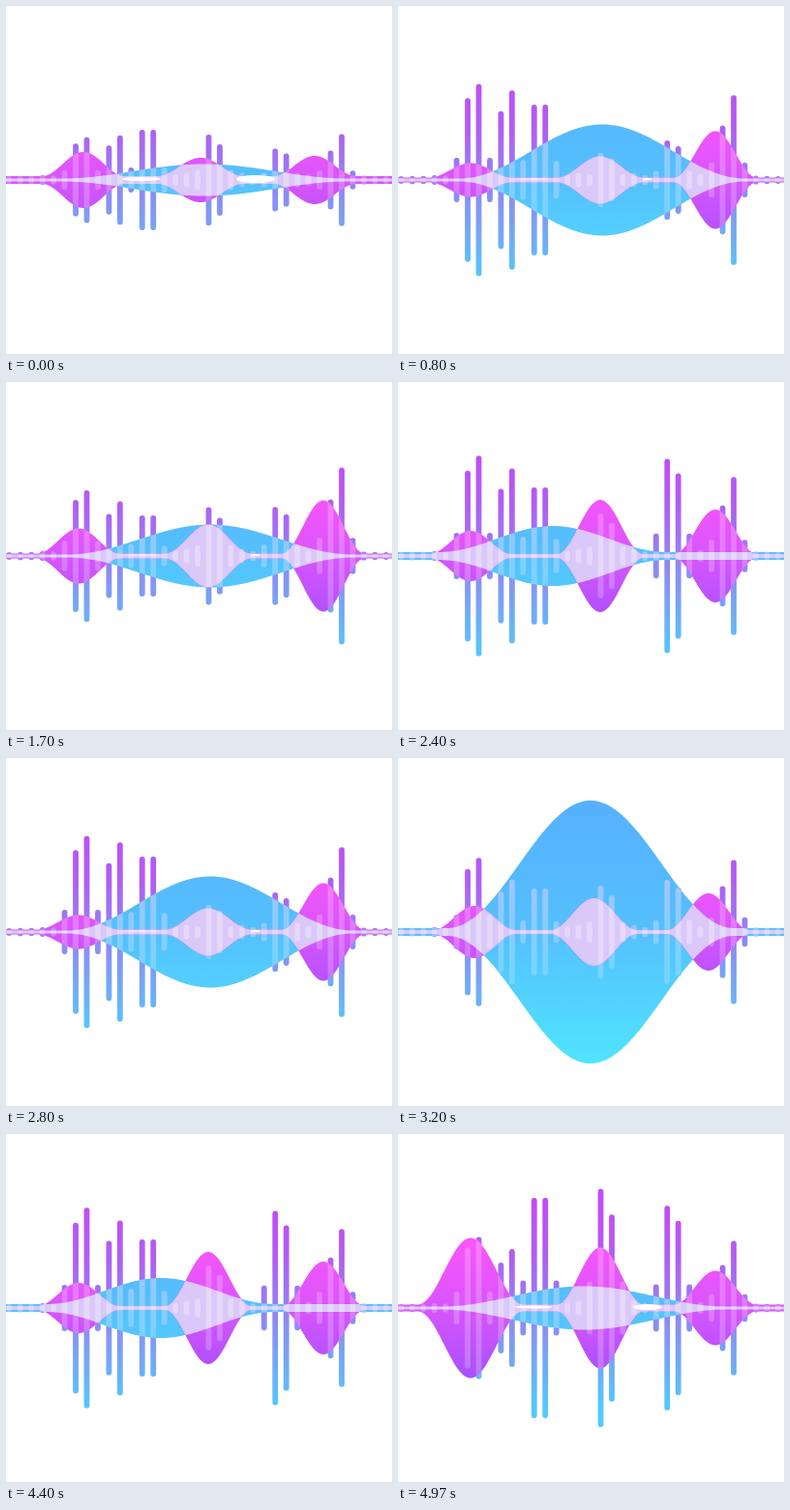
An HTML page with a canvas for the animation above (5070 ms loop, 399 by 360 pixels).

```html
<!DOCTYPE html>
<html>
<head>
<meta charset="utf-8">
<title>Sound wave</title>
<style>
  html, body { margin: 0; height: 100%; overflow: hidden; background: #fff; }
  canvas { display: block; }
</style>
</head>
<body>
<canvas id="stage" width="399" height="360"></canvas>
<script>
const ctx = document.getElementById('stage').getContext('2d');
const W = 399, MID = 180, LOOP = 5070, CYCLE = 25;

// Key poses of the cycle. humps: left, middle, right height and shift;
// blue: height, centre, edge; gap: white opening; beat: level of each bar pair.
const poses = [
  { step: 0, humps: [25, 19, 21, 1], blue: [15, 205, 1.5], gap: [4], beat: [41, 41, 52, 42, 30, 39] },
  { step: 5, humps: [24, 56, 46, 0], blue: [27, 160, 4], gap: [0], beat: [96, 80, 71, 39, 93, 67] },
  { step: 10, humps: [15, 22, 48, 0], blue: [56, 211, 1.5], gap: [1], beat: [92, 82, 78, 25, 38, 72] },
  { step: 12, humps: [69, 59, 35, 0], blue: [21, 192, 1.5], gap: [3], beat: [68, 54, 114, 110, 98, 57] },
  { step: 15, humps: [25, 33, 38, .8], blue: [132, 199, 4], gap: [0], beat: [71, 48, 45, 43, 50, 61] },
  { step: 21, humps: [26, 30, 55, 0], blue: [31, 211, 1.5], gap: [1], beat: [63, 50, 42, 45, 47, 75] }
];
poses.push({ ...poses[0], step: CYCLE });

// First bar of each pair, and how much the second one outgrows it.
const pairs = [[6, .08], [9, .13], [12, 0], [18, -.12], [24, -.08], [29, .22]];

function gradient(top, bottom, ...colors) {
  const g = ctx.createLinearGradient(0, top, 0, bottom);
  colors.forEach((c, i) => g.addColorStop(i / (colors.length - 1), c));
  return g;
}
const barPaint = gradient(75, 285, '#c24cfa', '#b05ef3', '#9482f2', '#76a6f5', '#50caff');
const bluePaint = gradient(44, 316, '#56b0ff', '#55c0fc', '#50e4ff');
const pinkPaint = gradient(108, 252, '#fc55fc', '#d855fb', '#a850ff');
const glowPaint = gradient(130, 230, 'rgba(235,210,255,.5)', 'rgba(190,235,255,.3)');

const bump = (x, centre, width) => {
  const d = Math.abs(x - centre) / width;
  return d < 1 ? (1 + Math.cos(Math.PI * d)) / 2 : 0;
};

function mirrored(height) {
  const path = new Path2D();
  for (let x = 0; x <= W; x++) path.lineTo(x, MID - height(x));
  for (let x = W; x >= 0; x--) path.lineTo(x, MID + height(x));
  path.closePath();
  return path;
}

function poseAt(step) {
  const i = poses.findIndex(p => p.step > step);
  const a = poses[i - 1], b = poses[i];
  const f = (step - a.step) / (b.step - a.step);
  const mix = key => a[key].map((v, n) => v + (b[key][n] - v) * f);
  return { humps: mix('humps'), blue: mix('blue'), gap: mix('gap')[0], beat: mix('beat') };
}

// Tall pairs with lower neighbours; the bars between them only ripple.
function barHeight(n, beat) {
  let height = 4 + 4 * Math.abs(Math.sin(n * 1.7)) * Math.sin(Math.PI * n / 34);
  pairs.forEach(([first, lean], i) => {
    const side = n - first;
    if (side === 0) height = beat[i] * (1 - lean);
    else if (side === 1) height = beat[i] * (1 + lean);
    else if (side === -1 || side === 2) height = Math.max(height, beat[i] * .25);
  });
  return height;
}

function barPath(beat) {
  const path = new Path2D();
  for (let n = 0; n < 35; n++) {
    const h = barHeight(n, beat);
    path.roundRect(.4 + n * 11.457, MID - h, 5.8, 2 * h, 2.9);
  }
  return path;
}

function paint(path, style, clip) {
  ctx.save();
  if (clip) ctx.clip(clip);
  ctx.fillStyle = style;
  ctx.fill(path);
  ctx.restore();
}

function draw(step) {
  const { humps: [left, middle, right, shift], blue: [rise, centre, edge], gap, beat } = poseAt(step);
  const leftWidth = 43 + Math.max(0, left - 26) * .27;
  const blueWidth = 148 - Math.max(0, 190 - centre);

  const pink = mirrored(x => 2 + gap * .5 +
    left * bump(x, 75 + 5 * shift, leftWidth) +
    middle * bump(x, 209 - 8 * shift, 45) +
    right * bump(x, 328 - 9 * shift, 43));
  const blue = mirrored(x => edge + rise * bump(x, centre, blueWidth));
  const bars = barPath(beat);

  ctx.fillStyle = '#fff';
  ctx.fillRect(0, 0, W, 360);
  paint(bars, barPaint);
  paint(blue, bluePaint);
  paint(bars, glowPaint, blue);
  paint(pink, pinkPaint);
  paint(bars, 'rgba(255,255,255,.22)', pink);
  ctx.save();
  ctx.clip(blue);
  paint(pink, '#dac8f8');
  paint(bars, 'rgba(255,255,255,.28)', pink);
  ctx.restore();

  const opening = new Path2D();
  opening.ellipse(140, MID - 1, 20, gap * .5, 0, 0, 7);
  opening.ellipse(258, MID - 1, 5 * gap, gap, 0, 0, 7);
  paint(opening, '#fff');
}

// Pictures advance every 80 ms, aligned to 30 Hz ticks.
function tick() {
  const ticks = Math.floor((performance.now() % LOOP + 4) * .03);
  draw(Math.min(62, Math.floor(ticks / 2.4 + 1e-6)) % CYCLE);
  requestAnimationFrame(tick);
}
tick();
</script>
</body>
</html>
```
